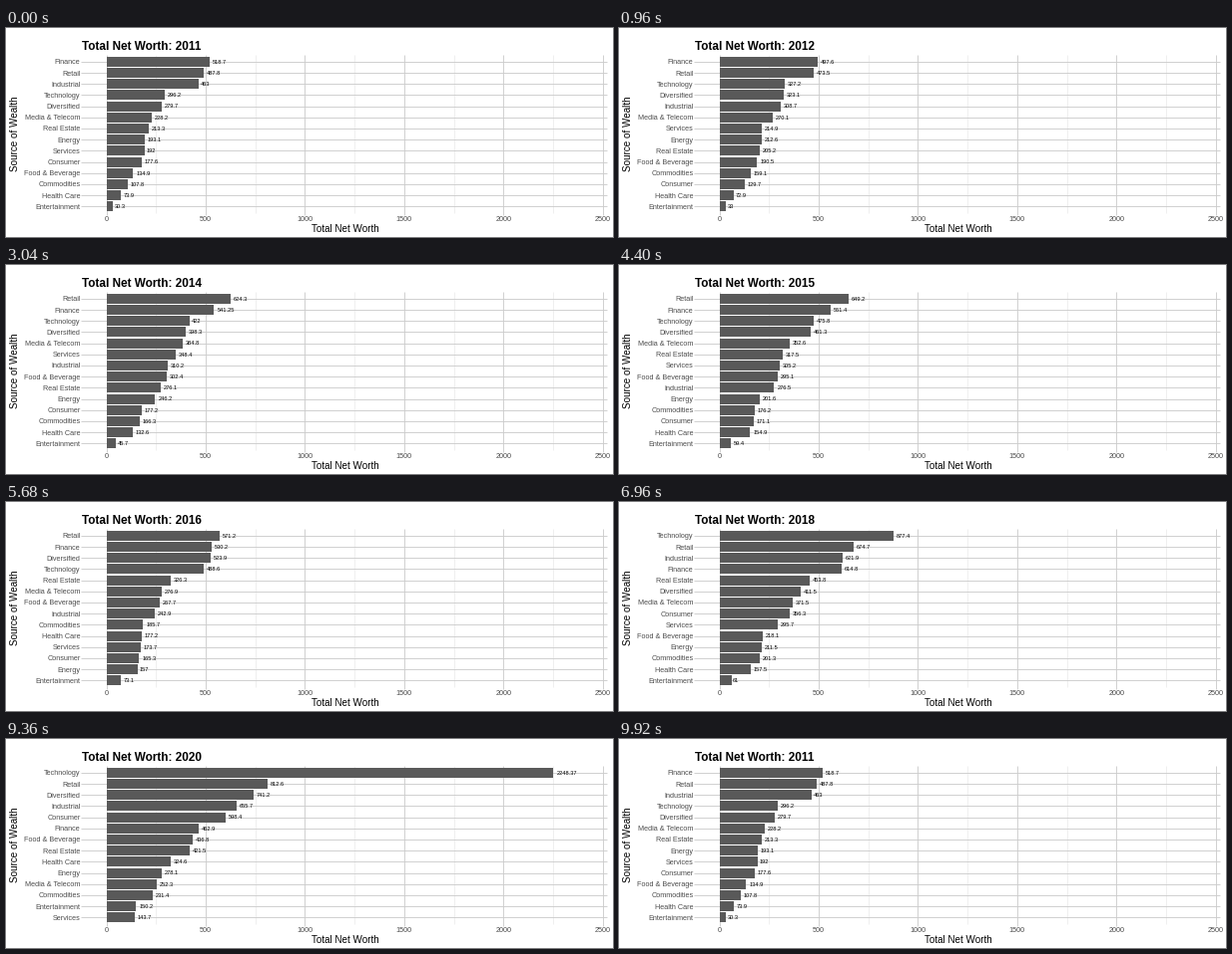
These frames come from a looping animation (608 px wide and 210 px high, 10000 ms). A matplotlib script:

```python
import matplotlib.pyplot as plt
from matplotlib.animation import FuncAnimation
from matplotlib.patches import Rectangle

W, H, DPI = 608, 210, 100
FRAMES, INTERVAL = 125, 80
LEFT, RIGHT, TOP, BOTTOM = 76, 602, 27, 186
X0, SCALE = 100.5, 0.1989
ROW0, ROW_STEP, BAR_H = 33.7, 11.2, 10.0

SECTORS = ["Finance", "Retail", "Industrial", "Technology", "Diversified",
           "Media & Telecom", "Real Estate", "Energy", "Services", "Consumer",
           "Food & Beverage", "Commodities", "Health Care", "Entertainment"]

# Net worth per year, in the order of SECTORS.
WORTH = {
    2011: [518.7, 487.8, 463, 296.2, 279.7, 228.2, 213.3,
           193.1, 192, 177.6, 134.9, 107.8, 73.9, 30.3],
    2012: [497.6, 473.5, 308.7, 327.2, 323.1, 270.1, 205.2,
           212.6, 214.9, 129.7, 190.5, 159.1, 72.9, 33],
    2013: [519.4, 543.1, 309.5, 374.6, 360.7, 327.5, 240.7,
           229.4, 281.7, 153.5, 246.4, 162.7, 102.8, 33.4],
    2014: [541.25, 624.3, 310.2, 422, 398.3, 384.8, 276.1,
           246.2, 348.4, 177.2, 302.4, 166.3, 132.6, 45.7],
    2015: [561.4, 649.2, 276.5, 475.8, 461.3, 352.6, 317.5,
           201.6, 305.2, 171.1, 295.1, 176.2, 154.9, 59.4],
    2016: [530.2, 571.2, 242.9, 488.6, 523.9, 276.9, 326.3,
           157, 173.7, 165.3, 267.7, 185.7, 177.2, 73.1],
    2017: [575.5, 614.2, 432.4, 607.9, 487.7, 324.1, 389.6,
           184.3, 234.7, 260.6, 242.8, 193.5, 167.4, 67.1],
    2018: [614.8, 674.7, 621.9, 877.4, 411.5, 371.5, 453.8,
           211.5, 295.7, 356.3, 218.1, 201.3, 157.5, 61],
    2019: [332.48, 491.29, 519.01, 1067.27, 645.79, 178.26, 389.99,
           263.94, 88.82, 440.75, 343.04, 169.75, 147.42, 128.05],
    2020: [462.9, 812.6, 655.7, 2248.37, 741.2, 252.3, 421.5,
           278.1, 143.7, 598.4, 436.8, 231.4, 324.6, 150.2],
}
STARTS = {2012: 12, 2013: 27, 2014: 36, 2015: 49, 2016: 62,
          2017: 74, 2018: 87, 2019: 98, 2020: 111, 2011: 124}

plt.rcParams["font.family"] = "Liberation Sans"
fig = plt.figure(figsize=(W / DPI, H / DPI), dpi=DPI, facecolor="white")
ax = fig.add_axes([0, 0, 1, 1])
ax.set_xlim(0, W)
ax.set_ylim(H, 0)
ax.axis("off")


def label(x, y, text, px, **style):
    return ax.text(x, y, text, fontsize=px * 72 / DPI, **style)


def line(xs, ys, color, px):
    ax.plot(xs, ys, color=color, lw=px * 72 / DPI,
            solid_capstyle="butt", zorder=1)


def x_pos(value):
    return X0 + value * SCALE


for value in range(0, 2501, 250):
    major = value % 500 == 0
    x = x_pos(value)
    line([x, x], [TOP, BOTTOM + (2 if major else 0)],
         "#cccccc" if major else "#e6e6e6", 0.9 if major else 0.6)
    if major:
        label(x, 193.5, str(value), 7.3, color="#4d4d4d", ha="center")

rows = [ROW0 + i * ROW_STEP for i in range(len(SECTORS))]
bars, names, values = [], [], []
for y in rows:
    line([LEFT - 1, RIGHT], [y, y], "#cccccc", 0.9)
    bars.append(ax.add_patch(Rectangle((X0, y - BAR_H / 2), 0, BAR_H,
                                       fc="#595959", lw=0, zorder=2)))
    names.append(label(74.5, y + 2.6, "", 7.3, color="#4d4d4d", ha="right"))
    values.append(label(0, y + 2, "", 5.6, color="black", zorder=3))

title = label(76, 21.5, "", 11.8, weight="bold")
label(339.5, 205, "Total Net Worth", 9.9, ha="center")
label(14, 106, "Source of Wealth", 9.9, rotation=90, ha="right", va="center")


def text_width(text, px):
    return px * sum(0.278 if c == "." else 0.556 for c in text)


def update(frame):
    year = max((y for y, start in STARTS.items() if frame >= start),
               key=STARTS.get, default=2011)
    title.set_text(f"Total Net Worth: {year}")
    ranking = sorted(zip(WORTH[year], SECTORS), reverse=True)
    for (worth, sector), bar, name, value in zip(ranking, bars, names, values):
        bar.set_width(worth * SCALE)
        name.set_text(sector)
        value.set_text(f"{worth:g}" if worth < 1000 else f"{worth:.2f}")
        value.set_x(x_pos(worth) + 0.2 * text_width(value.get_text(), 5.6))
    return [title, *bars, *names, *values]


anim = FuncAnimation(fig, update, frames=FRAMES, interval=INTERVAL,
                     repeat=True, repeat_delay=0)
plt.show()
```
